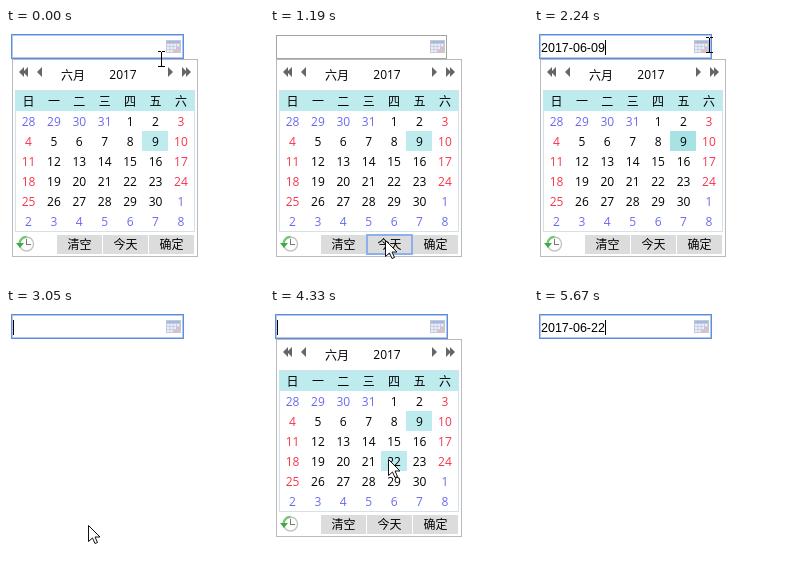
Animation, 258 px wide and 252 px high, one loop 5770 ms. Source, as an HTML page with a canvas:

```html
<!DOCTYPE html>
<html lang="zh">
<head>
<meta charset="utf-8">
<title>日期选择</title>
<style>
html, body { margin: 0; width: 100%; height: 100%; overflow: hidden; background: #fff; }
canvas { display: block; width: 258px; height: 252px; }
</style>
</head>
<body>
<canvas id="stage"></canvas>
<script>
const LOOP = 5770;
const TICK = 133;   // the pointer moves once per tick
const BLINK = 530;
const canvas = document.getElementById('stage');
const ctx = canvas.getContext('2d');
const ratio = window.devicePixelRatio || 1;
canvas.width = 258 * ratio;
canvas.height = 252 * ratio;
ctx.scale(ratio, ratio);

const UI_FONT = '12px "Open Sans", "Noto Sans CJK SC", "Noto Sans CJK", sans-serif';
const INPUT_FONT = '12.5px "Liberation Sans", Arial, sans-serif';

// Each scene starts at a time; a focused field blinks its caret from there or from `blink`.
const scenes = [
  { at: 0, value: '', open: true, focus: true, blink: -BLINK },
  { at: 1190, value: '', open: true, pressed: '今天' },
  { at: 1310, value: '2017-06-09', focus: true },
  { at: 1730, value: '2017-06-09' },
  { at: 2000, value: '2017-06-09', focus: true },
  { at: 2120, value: '2017-06-09', focus: true, open: true },
  { at: 3050, value: '', focus: true },
  { at: 3720, value: '', focus: true },
  { at: 3870, value: '', focus: true, open: true },
  { at: 4450, value: '', open: true },
  { at: 4720, value: '2017-06-22', focus: true, blink: 4570 }
];

// Key points of the pointer path: [tick, x, y]; straight lines between them
const path = [
  [0, 155, 31], [2, 97, 102], [3, 48, 129], [7, 140, 203], [9, 115, 212],
  [10, 115, 212], [11, 172, 128], [13, 195, 92], [15, 175, 17], [17, 175, 17],
  [21, 88, 212], [23, 82, 217], [25, 150, 62], [27, 174, 16], [29, 174, 16],
  [30, 152, 102], [32, 118, 151], [35, 112, 143], [37, 150, 200]
];

function pointerAt(t) {
  const tick = Math.floor((t + 50) / TICK);
  const next = path.findIndex(([end]) => end > tick);
  if (next < 0) return null;
  const [start, x0, y0] = path[next - 1];
  const [end, x1, y1] = path[next];
  const k = (tick - start) / (end - start);
  const x = Math.round(x0 + (x1 - x0) * k);
  const y = Math.round(y0 + (y1 - y0) * k);
  return { x, y, beam: y < 32 && x < 178 };
}

const grid = { x: 9.5, y: 83, w: 25.4, h: 20.1 };
const columnCenter = col => 22.5 + col * grid.w;

function dayUnder(pointer) {
  if (!pointer) return -1;
  const col = Math.floor((pointer.x - grid.x) / grid.w);
  const row = Math.floor((pointer.y - grid.y) / grid.h);
  return col >= 0 && col < 7 && row >= 0 && row < 6 ? row * 7 + col : -1;
}

function rect(x, y, w, h, color) {
  ctx.fillStyle = color;
  ctx.fillRect(x, y, w, h);
}

function frame(x, y, w, h, color) {
  ctx.strokeStyle = color;
  ctx.lineWidth = 1;
  ctx.strokeRect(x + .5, y + .5, w - 1, h - 1);
}

function label(text, x, y, color = '#000', font = UI_FONT, align = 'center') {
  ctx.font = font;
  ctx.textAlign = align;
  ctx.fillStyle = color;
  ctx.fillText(text, x, y);
}

function polygon(points, fill, stroke) {
  ctx.beginPath();
  points.forEach(([x, y]) => ctx.lineTo(x, y));
  ctx.closePath();
  ctx.fillStyle = fill;
  ctx.fill();
  if (stroke) { ctx.strokeStyle = stroke; ctx.lineWidth = 1; ctx.stroke(); }
}

function arc(x, y, r, from, to, width, color) {
  ctx.beginPath();
  ctx.arc(x, y, r, from * Math.PI, to * Math.PI);
  ctx.lineWidth = width;
  ctx.strokeStyle = color;
  ctx.stroke();
}

function calendarIcon() {
  rect(160, 12, 15, 13, '#c3c8dc');
  rect(161, 13, 13, 2, '#a3b9e2');
  for (let row = 0; row < 3; row++) {
    for (let col = 0; col < 4; col++) {
      rect(161 + col * 3.3, 16 + row * 3, 2.5, 2.2, row + col > 3 ? '#e8bcba' : '#eceef8');
    }
  }
}

function field({ value, focus, at, blink = at }, t) {
  if (focus) {
    frame(6, 7, 171, 23, '#b4c6e6');
    frame(5, 6, 173, 25, '#5b8fe6');
  } else {
    frame(6, 7, 171, 24, '#a3a3a3');
  }
  label(value, 7, 24, '#000', INPUT_FONT, 'left');
  const caretOn = Math.floor((t - blink) / BLINK) % 2 === 0;
  if (focus && caretOn) rect(value ? 71 : 7, 12, 1, 15, '#000');
  calendarIcon();
}

function navArrow(x, dir) {
  polygon([[x, 44], [x + 5 * dir, 39], [x + 5 * dir, 49]], '#666');
}

function historyIcon() {
  arc(20.5, 216, 7, 0, 2, 1.5, '#c3c8c3');
  arc(20.5, 216, 7, .95, 1.5, 2.5, '#7cc47c');
  polygon([[10, 215], [18, 215], [14, 220]], '#43a84a');
  polygon([[20, 211], [21, 211], [21, 216], [25, 216], [25, 217], [20, 217]], '#777');
}

function days(value, hover) {
  for (let i = 0; i < 42; i++) {
    const col = i % 7, row = Math.floor(i / 7);
    const date = new Date(2017, 4, 28 + i);
    const inMonth = date.getMonth() === 5;
    const current = inMonth && date.getDate() === 9;
    if (current || i === hover) {
      rect(Math.floor(grid.x + col * grid.w), Math.round(grid.y + row * grid.h), 26, 20,
        current && value ? '#a7e3e5' : '#bdebee');
    }
    const color = !inMonth ? '#6a6af0' : col % 6 === 0 ? '#f5354b' : '#000';
    label(date.getDate(), columnCenter(col), 98 + row * 20.05, color);
  }
}

function calendar({ value, pressed }, hover) {
  rect(6, 31, 186, 198, '#fff');
  frame(6, 31, 186, 198, '#bbb');
  [13, 17, 31].forEach(x => navArrow(x, 1));
  [167, 181, 185].forEach(x => navArrow(x, -1));
  label('六月', 67, 51.5);
  label('2017', 117, 51);

  frame(9, 62, 180, 142, '#d3e1ea');
  rect(9, 63, 179, 20, '#bdebee');
  [...'日一二三四五六'].forEach((name, i) => label(name, columnCenter(i), 77.5));
  days(value, hover);

  historyIcon();
  ['清空', '今天', '确定'].forEach((name, i) => {
    const x = 51 + i * 46;
    rect(x, 207, 45, 19, '#dcdcdc');
    if (name === pressed) {
      ctx.strokeStyle = '#8bb0ee';
      ctx.lineWidth = 2;
      ctx.strokeRect(x, 207, 45, 19);
    }
    label(name, x + 22.5, 221);
  });
}

function drawPointer({ x, y, beam }) {
  if (beam) {
    rect(x, y - 7, 1, 15, '#000');
    [-8, 7].forEach(dy => {
      rect(x - 3, y + dy, 3, 1, '#000');
      rect(x + 1, y + dy, 3, 1, '#000');
    });
    return;
  }
  const shape = [[0, 0], [0, 16], [4, 12.5], [6.5, 18], [9, 17], [6.5, 11.5], [11.5, 11.5]];
  polygon(shape.map(([dx, dy]) => [x + .5 + dx, y + .5 + dy]), '#fff', '#111');
}

function draw(t) {
  rect(0, 0, 258, 252, '#fff');
  const scene = scenes.findLast(({ at }) => at <= t);
  const pointer = pointerAt(t);
  if (scene.open) calendar(scene, dayUnder(pointer));
  field(scene, t);
  if (pointer) drawPointer(pointer);
}

const begin = performance.now();
function tick() {
  draw((performance.now() - begin) % LOOP);
  requestAnimationFrame(tick);
}
tick();
</script>
</body>
</html>
```
